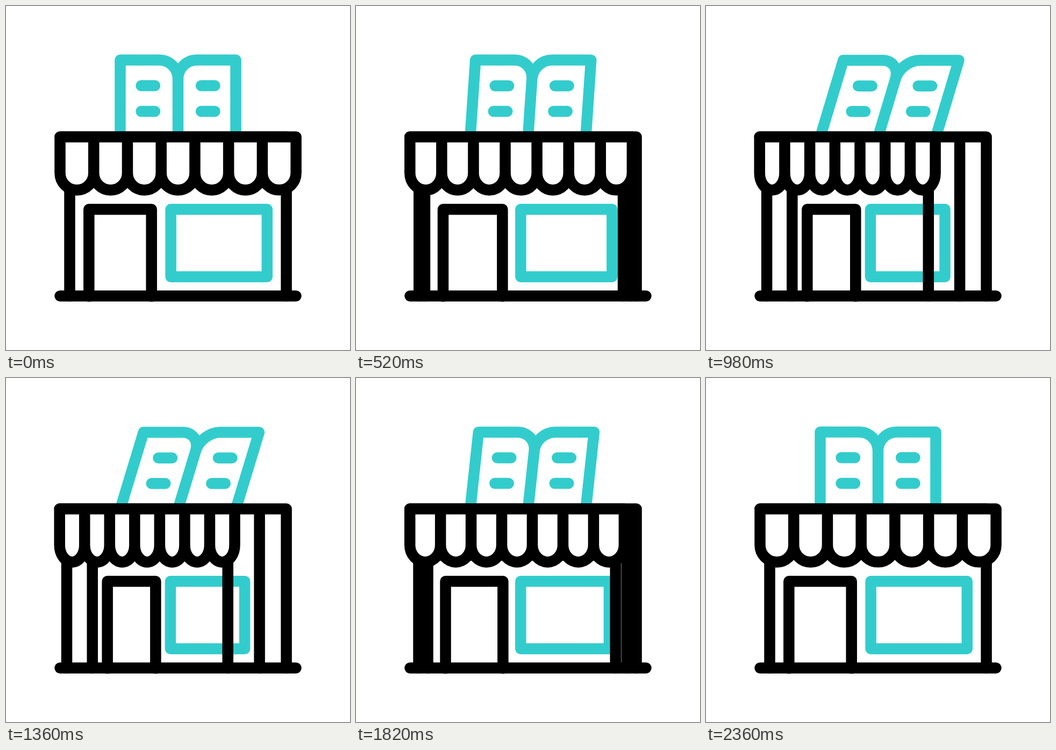
Recreate the animation shown at these times as an HTML page. Size 640 px wide and 640 px high, loop 2.4 s.

```html
<!DOCTYPE html>
<html lang="en">
<head>
<meta charset="utf-8">
<title>Bookshop</title>
<style>
html, body { margin: 0; width: 100%; height: 100%; overflow: hidden; background: #fff; }
svg { display: block; width: 100vw; height: 100vh; }
path { fill: none; stroke: #000; stroke-width: 20.5; stroke-linecap: round; stroke-linejoin: round; }
.teal { stroke: #33cccc; }
#awning { fill: #fff; }
</style>
</head>
<body>
<svg viewBox="0 0 640 640">
  <path id="book" class="teal"/>
  <path id="glass" class="teal"/>
  <path id="posts"/>
  <path id="door"/>
  <path id="awning"/>
  <path d="M100.5 539.5H539.5"/>
</svg>
<script>
const LOOP = 2400, TURN = 1200, END = 2380, STEP = 20;
const DEPTH = 115.3; // awning shrink in px at full turn
const TOP = 243.5, FLOOR = 539.5;
const draw = (id, d) => document.getElementById(id).setAttribute('d', d);

// cubic-bezier(k, 0, 1 - k, 1)
function ease(x, k = 0.85) {
  let lo = 0, hi = 1;
  for (let i = 0; i < 30; i++) {
    const s = (lo + hi) / 2, q = 1 - s;
    const v = 3 * s * q * q * k + 3 * s * s * q * (1 - k) + s * s * s;
    if (v < x) lo = s; else hi = s;
  }
  return lo * lo * (3 - 2 * lo);
}

function turnAt(t) {
  if (t < TURN) return ease(t / TURN);
  return t < END ? 1 - ease((t - TURN) / (END - TURN)) : 0;
}

function bookPath(r) {
  const lift = r * 0.004;
  const at = (x, y) => `${x + r * 0.38 * (TOP - y) / 143} ${y + lift} `;
  const page = dir => {
    const x = d => 320 + dir * d;
    return 'M' + at(x(107.5), TOP) + 'L' + at(x(107.5), 100.5) + 'L' + at(x(35), 100.5) +
      'C' + at(x(15.7), 100.5) + at(x(0), 116.2) + at(x(0), 135.5) + 'L' + at(x(0), TOP);
  };
  const row = (y, k) => [251.5, 363].map(x => `M${x + r * k} ${y + lift}h25.5`).join('');
  return page(-1) + page(1) + row(148.3, 0.28) + row(195.9, 0.169);
}

function awningPath(r) {
  const left = 100.5 - r * 0.007, right = 539.6 - r, pitch = (right - left) / 7;
  let d = `M${left} ${TOP}V311`;
  for (let i = 0; i < 7; i++) d += `a${pitch / 2} 31.4 0 0 0 ${pitch} 0`;
  d += `V${TOP}Z`;
  for (let i = 1; i < 7; i++) d += `M${left + i * pitch} ${TOP}V311`;
  return d;
}

function render(t) {
  const r = DEPTH * turnAt(t);
  const post = x => `M${x} ${TOP}V${FLOOR}`;
  draw('book', bookPath(r));
  draw('glass', `M${306.6 - r * 0.006} 378.3H${485.8 - r * 0.365}V503.7H${306.6 - r * 0.006}Z`);
  draw('posts', `M${100.5 - r * 0.007} ${TOP}H521.6V${FLOOR}` +
    post(118.5 - r * 0.048) + post(118.5 + r * 0.37) +
    post(521.6 - r * 0.438) + post(521.6 - r * 0.954));
  draw('door', `M${154.3 + r * 0.301} 540V378.3H${270.7 + r * 0.067}V540`);
  draw('awning', awningPath(r));
}

const start = performance.now();
function tick() {
  const t = (performance.now() - start) % LOOP;
  render(Math.floor(t / STEP) * STEP);
  requestAnimationFrame(tick);
}
tick();
</script>
</body>
</html>
```
